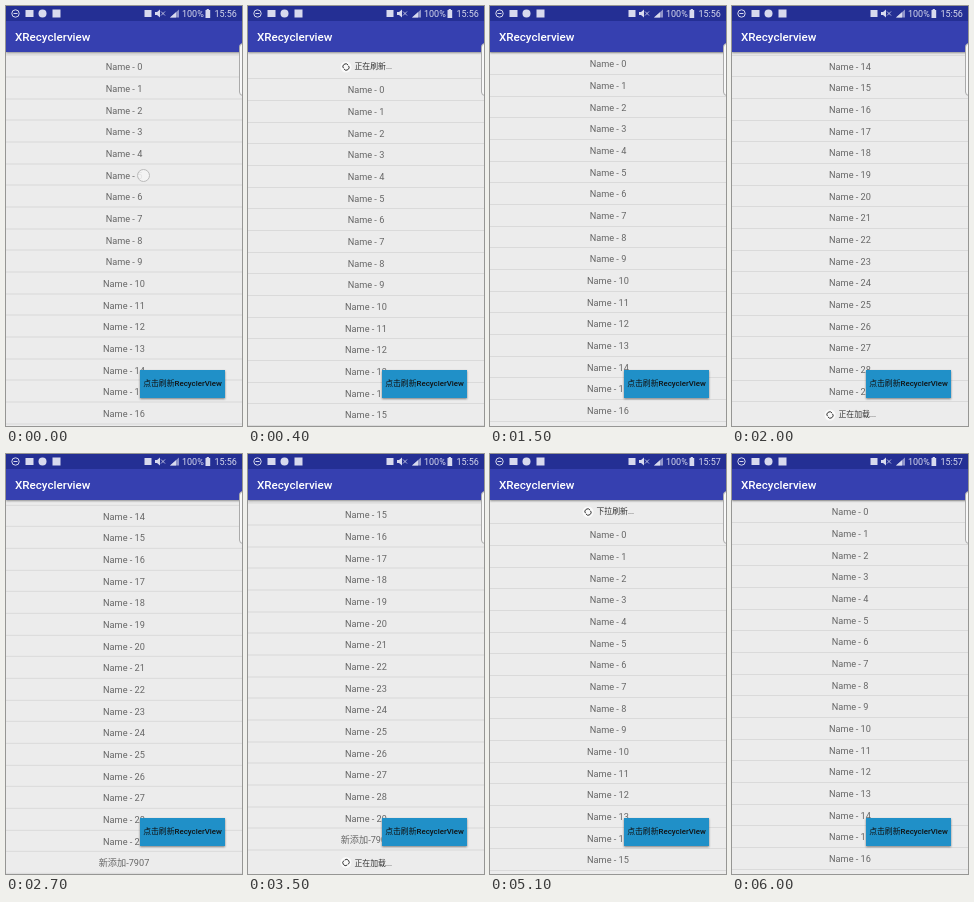
An HTML page that plays this animation: 236x420 px, repeating every 6.1 s.

```html
<!DOCTYPE html>
<html lang="zh">
<meta charset="utf-8">
<title>XRecyclerview</title>
<style>
  html, body { margin: 0; width: 100%; height: 100%; overflow: hidden; background: #ececec; }
  body { position: relative; font: 9.18px Roboto, "Noto Sans CJK SC", "Noto Sans CJK", sans-serif; color: #666; white-space: nowrap; }
  div, svg { position: absolute; box-sizing: border-box; }
  #list { left: 0; top: 47.2px; width: 236px; }
  .row, .note { left: 0; width: 236px; height: 21.67px; line-height: 21.67px; text-align: center; border-bottom: 1px solid #dadada; }
  .note { height: 25px; line-height: 25px; font-size: 7.87px; color: #333; text-align: left; padding-left: 106.5px; }
  .note svg { left: 92px; top: 6.5px; }
  #bar { top: 0; width: 236px; height: 46px; background: #3640b0; box-shadow: 0 1px 2px #0006; }
  #status { width: 236px; height: 15px; background: #242f94; }
  #title { left: 9px; top: 23px; font-size: 11.6px; font-weight: 500; line-height: 16px; color: #fff; }
  #button { left: 134px; top: 364px; width: 85px; height: 28px; background: #2090c8; box-shadow: 0 1px 2px #0007;
    font-size: 7.87px; font-weight: 500; line-height: 28px; text-align: center; color: #111; }
  #edge { left: 232.5px; top: 37px; width: 9px; height: 53px; border: 1px solid #aaa; border-radius: 4px; background: #f8f8f8; }
  #touch { left: 131px; top: 163px; width: 13px; height: 13px; border: 1px solid #bbb; border-radius: 50%; background: #f4f4f4e0; }
</style>
<body>
<div id="list"></div>
<div id="bar">
  <div id="status"></div>
  <svg width="236" height="15" fill="#d8daee" font-size="9">
    <g fill="none" stroke="#d8daee">
      <circle cx="9.5" cy="7.5" r="3.7"/>
      <path d="M7.5 7.5h4"/>
      <path d="M155 5.5l4 4m0-4l-4 4" stroke-width=".8"/>
    </g>
    <rect x="19.5" y="4" width="8" height="7"/>
    <circle cx="36.5" cy="7.5" r="4"/>
    <rect x="46.5" y="3.5" width="8" height="8"/>
    <rect x="138.5" y="4" width="7" height="7"/>
    <path d="M149 6h2l3-2.5v8l-3-2.5h-2z"/>
    <path d="M164 11.5l9-8v8z" opacity=".6"/>
    <path d="M164 11.5l6-5.3v5.3z"/>
    <path d="M199.5 4h1.2v-1h2.2v1h1.3v8h-4.7z"/>
    <text x="176" y="10.8">100%</text>
    <text id="clock" x="208.5" y="10.8"></text>
  </svg>
  <div id="title">XRecyclerview</div>
</div>
<div id="button">点击刷新RecyclerView</div>
<div id="edge"></div>
<div id="touch"></div>
<script>
const LOOP = 6100, STEP = 100, ROW = 21.67;
const $ = id => document.getElementById(id);
const list = $('list');

// [time, scroll offset]; negative offsets pull the header into view
const scroll = [
  [0, -2.5], [100, -14], [200, -32], [300, -26], [1200, -26], [1300, 0], [1600, 0],
  [1700, 70], [1800, 180], [1900, 260], [2000, 301], [2600, 301], [2700, 299.2],
  [2900, 299.2], [3000, 285], [3200, 322.5], [3900, 322.5], [4000, 321], [4500, 321],
  [4600, 270], [4700, 150], [4800, 40], [4900, 0], [5000, -23], [5700, -23], [5800, 0], [LOOP, 0]
];

function add(className, top, html) {
  const el = document.createElement('div');
  el.className = className;
  el.style.top = top + 'px';
  el.innerHTML = html;
  return list.appendChild(el);
}

const spinner = `<svg width="12" height="12"><circle cx="6" cy="6" r="5.5" fill="#fafafa"/>
  <g fill="none" stroke="#333"><path d="M3.4 7.2A2.8 2.8 0 0 1 8 4"/><path d="M8.6 4.8A2.8 2.8 0 0 1 4 8"/></g></svg><span></span>`;
const names = [...Array(30)].map((_, i) => 'Name - ' + i).concat('新添加-7907', '新添加-371');
const rows = names.map((name, i) => add('row', i * ROW, name));
const header = add('note', -25, spinner);
const footer = add('note', 0, spinner);

function offsetAt(t) {
  const i = scroll.findIndex(key => key[0] > t);
  const [t0, a] = scroll[i - 1], [t1, b] = scroll[i];
  return a + (b - a) * (t - t0) / (t1 - t0);
}

function setNote(note, text, angle) {
  note.querySelector('span').textContent = text;
  note.querySelector('g').setAttribute('transform', `rotate(${angle} 6 6)`);
}

function draw(now) {
  const t = Math.floor(now % LOOP / STEP) * STEP;
  const count = t < 2700 ? 30 : t < 4000 ? 31 : 32;
  const refreshing = t >= 300 && t < 1200 || t >= 5200;
  const loading = t >= 1800 && t < 2700 || t >= 3000 && t < 4000;

  list.style.transform = `translateY(${-offsetAt(t)}px)`;
  rows.forEach((row, i) => row.hidden = i >= count);
  footer.hidden = !loading;
  footer.style.top = count * ROW + 'px';
  setNote(header, refreshing ? '正在刷新...' : t === 200 ? '松开刷新...' : '下拉刷新...', refreshing ? t * .9 : 0);
  setNote(footer, '正在加载...', t * .9);
  $('touch').hidden = t > 0;
  $('clock').textContent = t < 3600 ? '15:56' : '15:57';
  requestAnimationFrame(draw);
}
draw(0);
</script>
</body>
</html>
```
